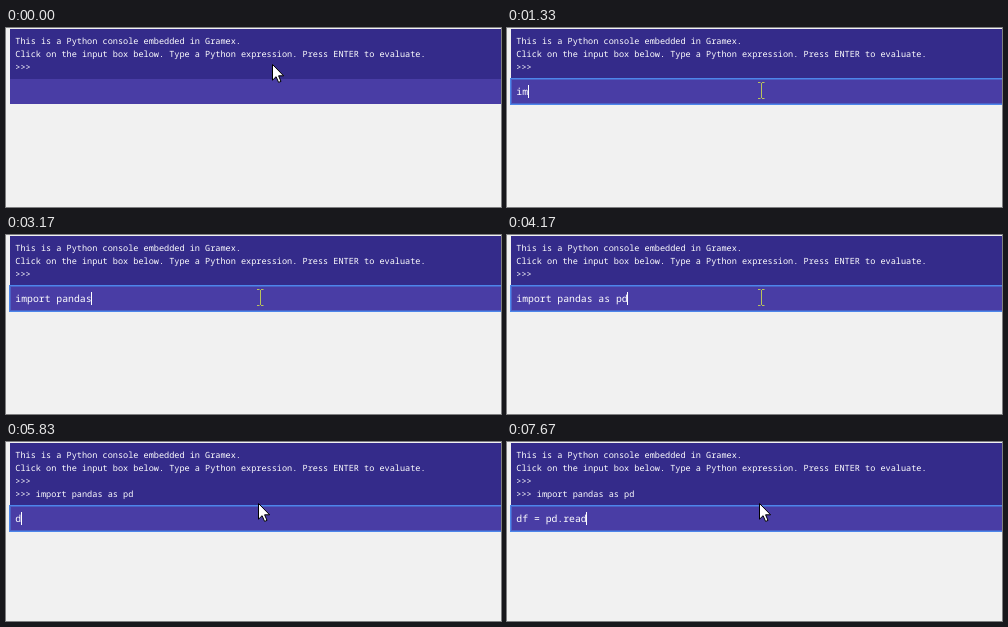
Write an HTML page that moves like this. It is 495 by 179 pixels and loops after 8 s.

```html
<!DOCTYPE html>
<html lang="en">
<head>
<meta charset="utf-8">
<title>Python console</title>
<style>
  html, body { margin: 0; height: 100%; overflow: hidden; background: #f1f1f1; }
  svg { display: block; }
  text {
    font-family: "Noto Sans Mono", "DejaVu Sans Mono", monospace;
    text-rendering: geometricPrecision;
    white-space: pre;
    fill: #fff;
  }
  .log { font-size: 8.555px; font-weight: 500; }
  .entry { font-size: 9.778px; }
</style>
</head>
<body>
<svg width="495" height="179" viewBox="0 0 495 179">
  <rect id="console" x="4" y="1" width="500" height="50" fill="#342b8a"/>
  <g class="log">
    <text x="9.33" y="16">This is a Python console embedded in Gramex.</text>
    <text x="9.33" y="29">Click on the input box below. Type a Python expression. Press ENTER to evaluate.</text>
    <text x="9.33" y="42">&gt;&gt;&gt;</text>
    <text x="9.33" y="55" id="echo">&gt;&gt;&gt; import pandas as pd</text>
  </g>
  <g id="input">
    <rect x="4" y="51" width="500" height="25" fill="#493da5"/>
    <g id="focus" fill="none" stroke="#4d86ea">
      <rect x="3.5" y="50.5" width="510" height="26"/>
      <rect x="4.5" y="51.5" width="510" height="24" stroke-opacity=".5"/>
    </g>
    <text class="entry" id="entry" x="9.33" y="67"></text>
    <rect id="caret" y="57" width="1" height="13" fill="#fff"/>
  </g>
  <path id="arrow" d="M.5.5V16.2L4.1 12.7 6.6 18.4 9 17.4 6.6 11.8H11.6Z"
        fill="#fff" stroke="#000"/>
  <path id="beam" d="M-3-7.5H-.5M1-7.5H3.5M.5-7V8M-3 8.5H-.5M1 8.5H3.5"
        fill="none" stroke="#b9c45c"/>
</svg>
<script>
const LOOP = 8000, ENTER = 4670, FOCUS = 670;
const CHAR_WIDTH = 5.867, TEXT_X = 9.33;
const $ = id => document.getElementById(id);

// Typing schedule: [time, number of characters in the input]
const firstLine = [
  [0, 0], [1170, 1], [1330, 2], [1670, 3], [1830, 4], [2000, 6], [2170, 7],
  [2500, 8], [2670, 9], [2830, 10], [3000, 12], [3170, 13],
  [3500, 14], [3670, 16], [3830, 17], [4170, 19]
];
// Pointer schedule: [time, shape, x, y]
const pointer = [
  [0, "arrow", 266, 36], [170, "arrow", 263, 42],
  [330, "beam", 257, 56], [500, "beam", 254, 62], [ENTER, "arrow", 252, 61]
];

const latest = (steps, t) => steps.filter(step => step[0] <= t).pop();
const show = (id, on) => $(id).setAttribute("visibility", on ? "visible" : "hidden");
const move = (id, x, y) => $(id).setAttribute("transform", `translate(${x} ${y})`);

function typed(t) {
  if (t < ENTER) return "import pandas as pd".slice(0, latest(firstLine, t)[1]);
  const count = Math.floor((t - 5830) / (1000 / 6) + 0.03) + 1;
  return "df = pd.read".slice(0, Math.max(0, count));
}

function draw(now) {
  const t = now % LOOP;
  const entered = t >= ENTER;
  const text = typed(t);

  $("console").setAttribute("height", entered ? 63 : 50);
  show("echo", entered);
  move("input", 0, entered ? 13 : 0);
  show("focus", t >= FOCUS);

  $("entry").textContent = text;
  $("caret").setAttribute("x", Math.floor(TEXT_X + CHAR_WIDTH * text.length));
  show("caret", t >= FOCUS && !(t >= 5170 && t < 5830));

  const [, shape, x, y] = latest(pointer, t);
  show("arrow", shape === "arrow");
  show("beam", shape === "beam");
  move(shape, x, y);
}

const start = performance.now();
function tick() {
  draw(performance.now() - start);
  requestAnimationFrame(tick);
}
tick();
</script>
</body>
</html>
```
